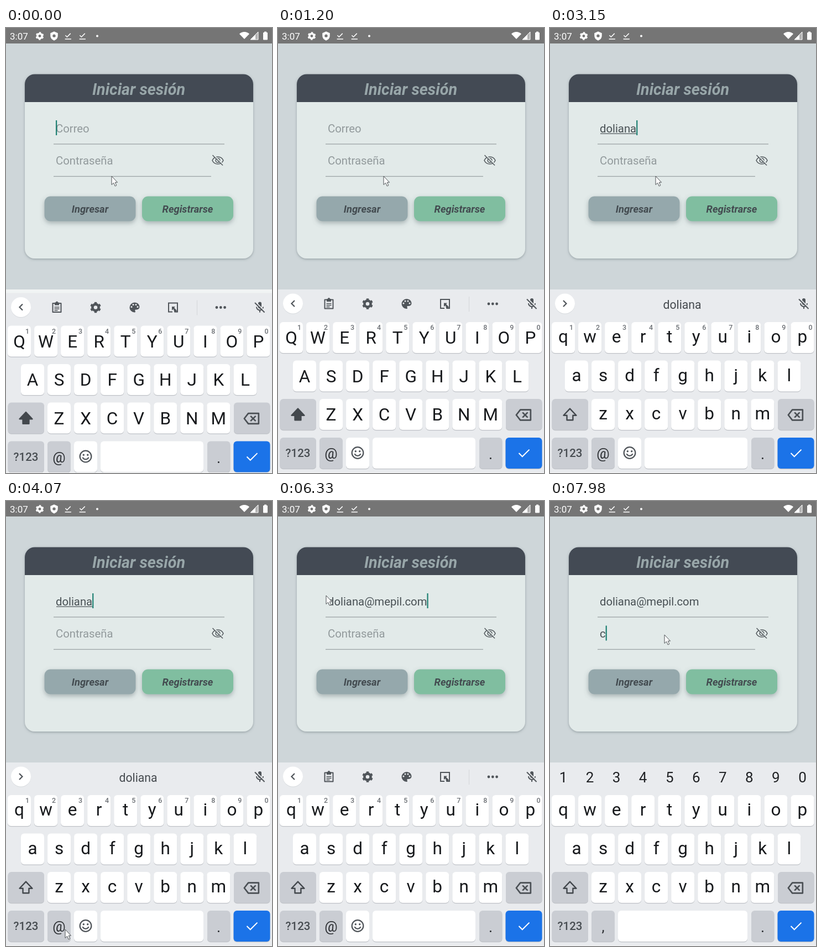
These frames come from a looping animation (481 by 805 pixels, 8 s). An HTML page:

```html
<!DOCTYPE html>
<html lang="es">
<head>
<meta charset="utf-8">
<title>Iniciar sesión</title>
<style>
  html, body { margin: 0; width: 100%; height: 100%; overflow: hidden; background: #ced6d9; }
  svg { display: block; width: 481px; height: 805px; font-family: Roboto, "Noto Sans", sans-serif; }
  .mid { text-anchor: middle; }
  .bold { font-weight: 700; font-style: italic; }
  .field { font-size: 20.3px; fill: #485054; white-space: pre; }
  .hint { font-size: 20.3px; fill: #929a9c; }
  .key { font-size: 31.5px; fill: #17191c; }
  .num { font-size: 12.5px; font-weight: 500; fill: #6c7075; }
  .line { fill: none; stroke: currentColor; stroke-width: 2; }
  .solid { fill: currentColor; }
</style>
</head>
<body>
<svg id="stage" viewBox="0 0 481 805" xmlns="http://www.w3.org/2000/svg"></svg>
<script>
const LOOP = 8000;
const stage = document.getElementById('stage');

// Markup helpers
const rect = (x, y, w, h, fill, r = 0, more = '') =>
  `<rect x="${x}" y="${y}" width="${w}" height="${h}" rx="${r}" fill="${fill}" ${more}/>`;
const text = (x, y, str, cls, more = '') => `<text x="${x}" y="${y}" class="${cls}" ${more}>${str}</text>`;
const group = (id, inner) => `<g id="${id}">${inner}</g>`;
const icon = (cx, cy, size, color, inner) =>
  `<g color="${color}" transform="translate(${cx - size / 2} ${cy - size / 2}) scale(${size / 24})">${inner}</g>`;
const line = (d, more = '') => `<path class="line" d="${d}" ${more}/>`;
const solid = (d, more = '') => `<path class="solid" d="${d}" ${more}/>`;
const dot = (x, y, r, fill = 'currentColor') => `<circle cx="${x}" cy="${y}" r="${r}" fill="${fill}"/>`;
const shadow = (id, dy, blur, alpha) =>
  `<filter id="${id}" x="-15%" y="-40%" width="130%" height="190%">` +
  `<feDropShadow dx="0" dy="${dy}" stdDeviation="${blur}" flood-color="#5c6a70" flood-opacity="${alpha}"/></filter>`;

const KB = '#e9ebee', SPECIAL = '#cacdd3', INK = '#50555a';

const gear =
  '<circle class="line" cx="12" cy="12" r="5.6" style="stroke-width:4.6"/>' +
  '<circle class="line" cx="12" cy="12" r="8.5" pathLength="12" stroke-dasharray="1 1" stroke-dashoffset="-.5" style="stroke-width:2.6"/>';
const clipboard =
  line('M4.5 4.5h15v16h-15z', 'stroke-linejoin="round"') + solid('M8 3h8v5H8z') + dot(12, 3, 2) +
  line('M7.5 11.5h9M7.5 14.5h9M7.5 17.5h6', 'style="stroke-width:1.6"');
const palette =
  solid('M12 3a9 9 0 0 0 0 18c.83 0 1.5-.67 1.5-1.5 0-.39-.15-.74-.39-1-.23-.27-.38-.62-.38-1 0-.83.67-1.5 1.5-1.5H16a5 5 0 0 0 5-5c0-4.4-4-8-9-8z') +
  [[6.5, 11], [9.5, 7], [14.5, 7], [17.5, 11]].map(p => dot(...p, 1.5, KB)).join('');
const resize = line('M11 20H4V4h16v16h-2') + solid('M10 10.5h6l-2 2 4.5 4.5V21h-4l-1.5-6-3 2z');
const micOff =
  solid('M9 5a3 3 0 0 1 6 0v6a3 3 0 0 1-6 0z') + line('M6 11a6 6 0 0 0 12 0M12 17v4') +
  `<path d="M4.5 2.5 21.5 19.5" stroke="${KB}" stroke-width="2"/>` + line('M3 3.5 20.5 21');
const eyeOff =
  line('M2 12C4 7.5 7.8 5.5 12 5.5s8 2 10 6.5c-2 4.500-5.800 6.500-10 6.500S4 16.500 2 12z'.replace(/00\b/g, ''), 'style="stroke-width:1.6"') +
  '<circle class="line" cx="12" cy="12" r="3.8" style="stroke-width:1.6"/>' +
  '<path d="M4 2 22 20" stroke="#e2eae9" stroke-width="2"/>' + line('M2.5 2.5 21 21', 'style="stroke-width:1.6"');
const shiftPath = 'M12 3 2.5 13H7.5v7h9v-7h5z';
const backspace =
  line('M8 5h14v14H8L2.5 12z', 'stroke-linejoin="round"') + line('M11 8.5l7 7M18 8.5l-7 7');
const smiley =
  '<circle class="line" cx="12" cy="12" r="9.2"/>' + dot(8.7, 9.5, 1.5) + dot(15.3, 9.5, 1.5) +
  line('M7.2 13.5a5.2 5.2 0 0 0 9.6 0');
const done = line('M4.5 11 8.5 15 17 6.5') + line('M3.5 20h15');

function statusBar() {
  return rect(0, 0, 481, 28, '#757575') + text(7, 21, '3:07', '', 'font-size="17" fill="#fff"') +
    icon(61, 14.5, 18, '#fff', gear) +
    icon(87, 14.5, 18, '#fff', solid('M12 1 21 5v6c0 6-4 10-9 12-5-2-9-6-9-12V5z') + dot(12, 11.5, 3.6, '#757575')) +
    icon(113, 14, 18, '#fff', done) + icon(139, 14, 18, '#fff', done) + dot(165, 14.5, 2, '#fff') +
    icon(431, 12.5, 18, '#fff', solid('M0 9.5a17 17 0 0 1 24 0L12 22z')) +
    '<path d="M456 7v14h-14z" fill="#fff" opacity=".45"/><path d="M451 12v9h-9z" fill="#fff"/><path d="M456 7v14h-14z" fill="none" stroke="#fff"/>' +
    rect(465, 8, 8, 13.5, '#fff', 1) + rect(467, 6.5, 4, 3, '#fff');
}

function button(x, w, fill, label) {
  return rect(x, 304.5, w, 45, fill, 11, 'filter="url(#raised)"') +
    text(x + w / 2, 334, label, 'mid bold', 'font-size="18.3" fill="#434b50"');
}

function card() {
  return rect(34, 83.5, 413, 333.5, '#e2eae9', 18, 'filter="url(#soft)"') +
    '<path d="M34 134V101.5a18 18 0 0 1 18-18H429a18 18 0 0 1 18 18V134z" fill="#434a54"/>' +
    text(240, 121, 'Iniciar sesión', 'mid bold', 'font-size="28.8" fill="#98a6a9"') +
    rect(86, 209.3, 309, 1.3, '#9da5a6') + rect(86, 267.8, 285, 1.3, '#9da5a6') +
    text(90, 189, 'Correo', 'hint', 'id="mailHint"') + text(90, 247, 'Contraseña', 'hint', 'id="passHint"') +
    text(90, 189, '', 'field', 'id="mail"') + text(90, 247, '', 'field', 'id="pass"') +
    rect(91, 190.5, 0, 1.2, '#485054', 0, 'id="underline"') +
    rect(0, 0, 2.2, 27, '#1f8173', 0, 'id="caret"') +
    icon(383, 239.5, 24, '#555c60', eyeOff) +
    button(69.5, 165, '#95a8ac', 'Ingresar') + button(246, 165, '#80bea0', 'Registrarse');
}

function keyBox(x, y, w, fill) {
  return rect(x, y + 1.3, w, 56, '#bfc2c7', 6) + rect(x, y, w, 56, fill, 6);
}

function letterRow(letters, x0, y) {
  return [...letters].map((c, i) => {
    const x = x0 + 48.05 * i;
    return keyBox(x - 21, y, 42, '#fff') + text(x, y + 39, c, 'key mid letter');
  }).join('');
}

function keyboard() {
  const spread = (y, dx, cls, more) =>
    [...'1234567890'].map((d, i) => text(24 + dx + 48.05 * i, y, d, cls, more)).join('');
  const tools = icon(92, 499, 24, INK, clipboard) + icon(162, 499, 24, INK, gear) +
    icon(232.5, 499, 24, INK, palette) + icon(302, 499, 24, INK, resize) +
    rect(345, 486, 1, 27, '#d3d6da') + [381, 388.3, 395.6].map(x => dot(x, 499, 2.4, INK)).join('');
  const chevron = dot(27, 499.5, 18, '#d5d8dc') + dot(27, 498.5, 18, '#fff') +
    `<path id="chevron" fill="none" stroke="${INK}" stroke-width="2.2"/>` +
    icon(459, 499, 24, INK, micOff);
  const mailRow = keyBox(75, 741, 42, SPECIAL) + text(96, 779, '@', 'mid', 'font-size="26" fill="#2b2e32"') +
    keyBox(123, 741, 42, '#fff') + icon(144, 768.5, 27, INK, smiley) + keyBox(171, 741, 186, '#fff');
  const passRow = keyBox(75, 741, 42, SPECIAL) + text(96, 779, ',', 'mid', 'font-size="26" fill="#2b2e32"') +
    keyBox(123, 741, 234, '#fff');

  return rect(0, 473, 481, 340, KB) +
    group('tools', tools) + group('strip', chevron) +
    text(239, 507.5, '', 'mid', 'id="suggest" font-size="21.2" fill="#454a4f"') +
    group('topDigits', spread(509, 0, 'mid', 'font-size="26" fill="#202225"')) +
    letterRow('QWERTYUIOP', 24, 532) + group('smallDigits', spread(546, 14.5, 'num mid')) +
    letterRow('ASDFGHJKL', 48, 601.5) + letterRow('ZXCVBNM', 96, 671) +
    keyBox(3.5, 671, 65.5, SPECIAL) +
    icon(36, 699.5, 29, '#43484d', `<path id="shift" d="${shiftPath}" stroke="currentColor" stroke-width="2" stroke-linejoin="round"/>`) +
    keyBox(412, 671, 65.5, SPECIAL) + icon(443.5, 700, 32, '#4b5055', backspace) +
    keyBox(3.5, 741, 65.5, SPECIAL) +
    text(36, 776, '?123', 'mid', 'font-size="20.5" font-weight="500" fill="#474c51"') +
    group('mailRow', mailRow) + group('passRow', passRow) +
    keyBox(364, 741, 41.5, SPECIAL) + text(384.5, 780, '.', 'mid', 'font-size="27" fill="#2b2e32"') +
    keyBox(411.5, 741, 66, '#1b73e8') +
    '<path d="M435.5 769l6.3 6.3 12.7-12.7" fill="none" stroke="#fff" stroke-width="2"/>';
}

stage.innerHTML =
  `<defs>${shadow('soft', 1.5, 2, .5)}${shadow('raised', 3.5, 4, .45)}</defs>` +
  rect(0, 0, 481, 805, '#ced6d9') + statusBar() + card() +
  rect(0, 473, 481, 332, '#f1f4f4') + group('keyboard', keyboard()) +
  rect(0, 804, 481, 1, '#f6f7f7') +
  '<path id="mouse" d="M0 0V15.5L3.6 12.2 6.2 18 8.8 16.8 6.3 11.2H10.5z" fill="#fff" stroke="#4a4f52" stroke-width="1" stroke-linejoin="round"/>';

const el = id => document.getElementById(id);
const show = (id, on) => el(id).setAttribute('visibility', on ? 'visible' : 'hidden');

// Timeline
const NAME = 'doliana';
const MAIL = NAME + '@mepil.com';
const strokes = [1300, 1420, 1530, 1640, 1750, 1860, 1970, 4320, 5010, 5130, 5260, 5380, 5520, 5800, 5950, 6070, 6210];
const CLICK = 7350, PASS_KEYS = 7450, PASS_TYPED = 7840;
const LAG = 90;
const mousePath = [
  [0, 191, 268], [3450, 191, 268], [3960, 107, 775], [4480, 107, 775],
  [4960, 87, 171], [6850, 87, 171], [7260, 207, 242], [LOOP, 207, 242]
];
const letters = [...document.querySelectorAll('.letter')];
const typed = t => strokes.filter(s => s <= t).length;

function mouseAt(t) {
  const i = mousePath.findIndex((p, k) => k && t <= p[0]);
  const [t0, x0, y0] = mousePath[i - 1], [t1, x1, y1] = mousePath[i];
  const u = (t - t0) / (t1 - t0), e = u * u * (3 - 2 * u);
  return [x0 + (x1 - x0) * e, y0 + (y1 - y0) * e];
}

function caretOn(t) {
  const resets = [-300, ...strokes, CLICK, PASS_TYPED].filter(s => s <= t);
  return (t - resets[resets.length - 1]) % 1000 < 500;
}

function render(t) {
  const count = typed(t), seen = typed(t - LAG);
  const inPass = t >= CLICK, passKeys = t >= PASS_KEYS;
  const composing = seen > 0 && seen <= NAME.length;

  el('mail').textContent = MAIL.slice(0, count);
  el('pass').textContent = t >= PASS_TYPED ? 'c' : '';
  show('mailHint', !count);
  show('passHint', t < PASS_TYPED);

  const active = el(inPass ? 'pass' : 'mail');
  el('caret').setAttribute('x', 90 + active.getComputedTextLength());
  el('caret').setAttribute('y', inPass ? 225.5 : 167);
  show('caret', caretOn(t));

  const marked = count <= NAME.length && seen ? el('mail').getSubStringLength(0, seen) : 0;
  el('underline').setAttribute('width', Math.max(0, marked - 1));

  el('suggest').textContent = composing ? NAME.slice(0, seen) : '';
  el('chevron').setAttribute('d', composing ? 'M24 493l5.5 5.5-5.5 5.5' : 'M30 493l-5.5 5.5 5.5 5.5');
  show('tools', !composing && !passKeys);
  show('strip', !passKeys);
  show('topDigits', passKeys);
  show('smallDigits', !passKeys);
  show('mailRow', !passKeys);
  show('passRow', passKeys);

  // Small letters sit slightly higher on their keys
  const upper = !seen;
  for (const l of letters) {
    l.textContent = upper ? l.textContent.toUpperCase() : l.textContent.toLowerCase();
    l.setAttribute('dy', upper ? 0 : -2);
  }
  el('shift').setAttribute('fill', upper ? 'currentColor' : 'none');

  const slide = 6.5 * Math.min(1, Math.max(0, 1 - (t - 70) / 130));
  el('keyboard').setAttribute('transform', `translate(0 ${slide})`);
  el('mouse').setAttribute('transform', `translate(${mouseAt(t)})`);
}

const start = performance.now();
function tick() {
  render((performance.now() - start) % LOOP);
  requestAnimationFrame(tick);
}
tick();
</script>
</body>
</html>
```
